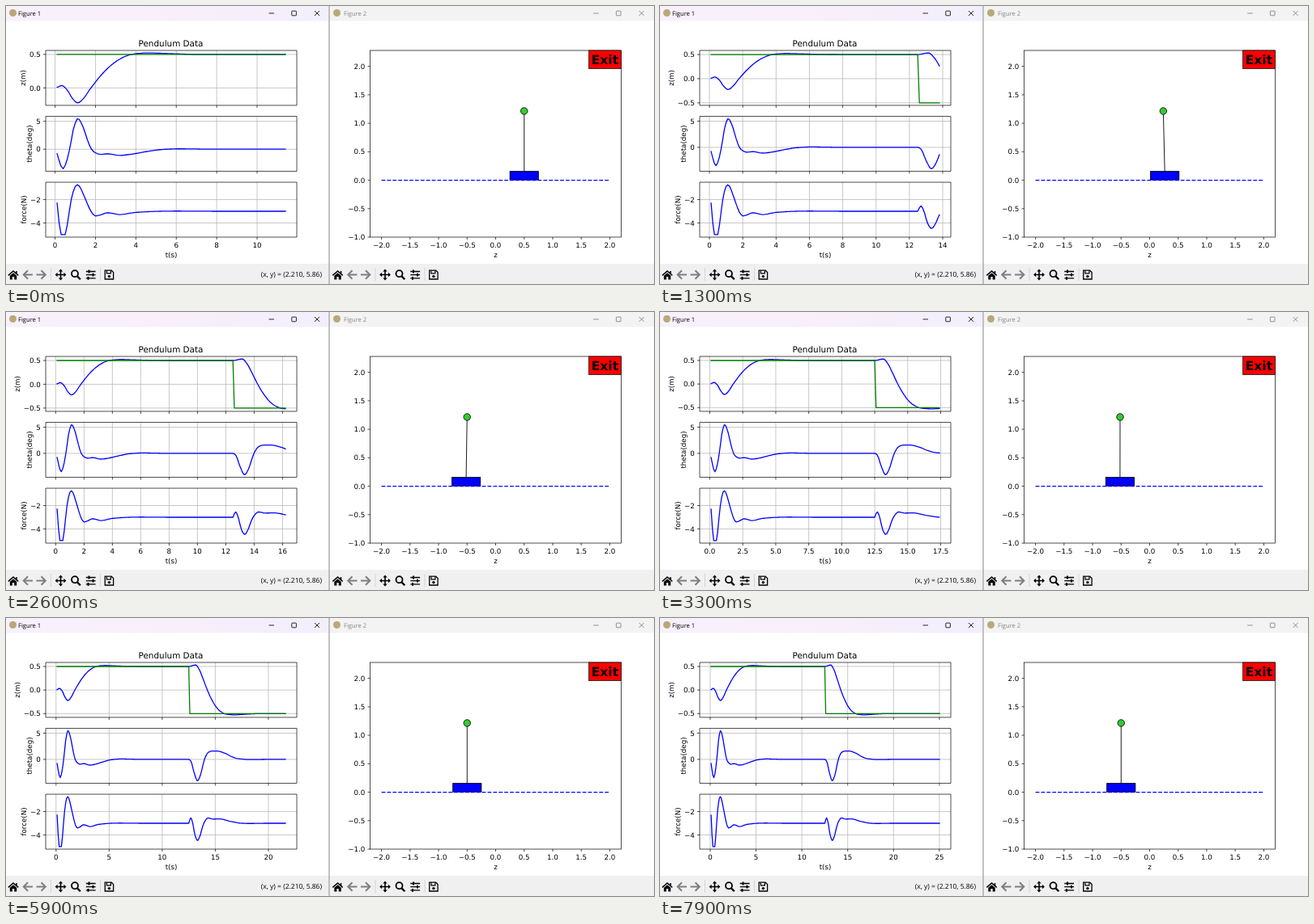
Animation of 800 by 344 pixels, one loop 8000 ms. Source, as an HTML page:

```html
<!DOCTYPE html>
<html lang="en">
<head>
<meta charset="utf-8">
<title>Pendulum</title>
<style>
  html, body { margin: 0; width: 100%; height: 100%; overflow: hidden; background: #fff; }
  svg { display: block; width: 800px; height: 344px; }
  text { font: 8.68px "DejaVu Sans", sans-serif; text-rendering: geometricPrecision; }
  .ui { font: 7.6px "Open Sans", sans-serif; }
  .coords { font: 8.5px "Open Sans", sans-serif; }
  .title { font-size: 10.42px; }
  .exit { font-size: 15.6px; font-weight: bold; }
  .mid { text-anchor: middle; }
  .end { text-anchor: end; }
  .grid { stroke: #b0b0b0; stroke-width: .7; fill: none; }
  .axis { stroke: #000; stroke-width: .7; fill: none; }
  .curve { stroke-width: 1.3; fill: none; stroke-linejoin: round; stroke-linecap: square; }
</style>
</head>
<body>
<svg viewBox="0 0 800 344">
  <defs>
    <linearGradient id="bar">
      <stop offset="0" stop-color="#f8f1fd"/>
      <stop offset=".5" stop-color="#f8effa"/>
      <stop offset="1" stop-color="#f2effc"/>
    </linearGradient>
    <g id="buttons" fill="none" stroke-width=".9">
      <path d="M324.5 9H331M381 6l6 6M387 6l-6 6"/>
      <rect x="352.8" y="6.2" width="5.6" height="5.6" rx=".6"/>
    </g>
    <g id="tools" fill="none" stroke="#000">
      <path stroke-width="1.5" d="M2.8 333.4L9 328l6.2 5.4M13 328v3"/>
      <path fill="#000" stroke="none" d="M4.8 333.8L9 330.2l4.2 3.6V338.4H10.2V335H7.8v3.4H4.8Z"/>
      <path stroke="#7f7f7f" stroke-width="2" d="M33 332.5H22M27 327.2L21.7 332.5L27 337.8M37.5 332.5H48.5M43.5 327.2L48.8 332.5L43.5 337.8"/>
      <path stroke="#cfcfcf" stroke-width=".8" d="M55.5 324V340M116.5 324V340"/>
      <path stroke-width="1.6" d="M62 332.5H73M67.5 327V338"/>
      <path fill="#000" stroke="none" d="M67.5 325.6l2.7 3h-5.4ZM67.5 339.4l2.7-3h-5.4ZM60.6 332.5l3-2.7v5.4ZM74.4 332.5l-3-2.7v5.4Z"/>
      <circle cx="85" cy="331.2" r="4" stroke-width="1.8"/>
      <path stroke-width="2.3" d="M88.2 334.6L91.8 338.2"/>
      <path stroke-width="1.3" d="M98.8 328.5H110.6M98.8 332.6H110.6M98.8 336.8H110.6"/>
      <path stroke-width="2" d="M102.5 326.6v3.8M107.5 330.7v3.8M101.5 334.9v3.8"/>
      <path stroke-width="1.3" d="M122.2 327.2H130.2L132.6 329.6V338H122.2Z"/>
      <path stroke-width="1.2" d="M124.4 327.5v3.4H129.4V327.5"/>
      <circle cx="127.4" cy="334.6" r="1.7" fill="#000" stroke="none"/>
    </g>
  </defs>

  <rect width="800" height="344" fill="#fff"/>
  <rect width="398.5" height="18.5" fill="url(#bar)"/>
  <rect x="399.5" width="400.5" height="18.5" fill="#f3f3f3"/>
  <rect y="319" width="800" height="25" fill="#f0f0f0"/>
  <rect x="398.3" width="1.4" height="344" fill="#a9a9ab"/>
  <circle cx="8.5" cy="8.5" r="4.5" fill="#b9a878"/>
  <circle cx="408.5" cy="8.5" r="4.5" fill="#b9a878"/>
  <text class="ui" x="15" y="11.7">Figure 1</text>
  <text class="ui" x="417" y="11.7" fill="#858585">Figure 2</text>
  <use href="#buttons" stroke="#111"/>
  <use href="#buttons" x="400.6" stroke="#858585"/>
  <use href="#tools"/>
  <use href="#tools" x="400.5"/>
  <text class="coords end" x="390" y="335.2">(x, y) = (2.210, 5.86)</text>
  <text class="title mid" x="203.5" y="49.6">Pendulum Data</text>

  <g id="plots"></g>

  <g id="scene">
    <g id="sceneTicks"></g>
    <rect id="cart" y="204.63" width="35.22" height="10.57" fill="#00f" stroke="#000" stroke-width=".87"/>
    <circle id="bob" r="4.23" fill="#32cd32" stroke="#000" stroke-width=".87"/>
    <path id="rod" stroke="#000" stroke-width=".9"/>
    <path d="M463.6 215.55H745.4" stroke="#00f" stroke-width="1.3" stroke-dasharray="4.81 2.08"/>
    <rect class="axis" x="449.5" y="55" width="310" height="231"/>
    <rect x="719.5" y="55" width="40" height="22.5" fill="#f00" stroke="#000" stroke-width=".7"/>
    <text class="exit mid" x="739.4" y="71.5">Exit</text>
  </g>
</svg>

<script>
const LOOP = 8000, STEP = 100;
const $ = id => document.getElementById(id);

// Shape-preserving cubic through flat [t, v, t, v, ...] knots.
function spline(flat) {
  const t = flat.filter((_, i) => i % 2 === 0), v = flat.filter((_, i) => i % 2);
  const d = t.slice(1).map((x, i) => (v[i + 1] - v[i]) / (x - t[i]));
  const m = t.map((_, i) => {
    const a = d[i - 1], b = d[i];
    return a * b > 0 ? 2 * a * b / (a + b) : 0;
  });
  return x => {
    if (x >= t.at(-1)) return v.at(-1);
    const i = Math.max(0, t.findIndex(k => k > x) - 1);
    const h = t[i + 1] - t[i], s = Math.max(0, (x - t[i]) / h), r = 1 - s;
    return v[i] * (1 + 2 * s) * r * r + v[i + 1] * s * s * (3 - 2 * s)
      + h * s * r * (m[i] * r - m[i + 1] * s);
  };
}

// Simulated seconds reached at each moment of the loop.
const CLOCK = [[0, 11.4], [1300, 13.8], [2000, 15.1], [3300, 17.4], [4600, 19.5], [5900, 21.6], [7900, 25]];

const position = spline([.1, .01, .32, .037, .6, -.03, .85, -.155, 1.12, -.224, 1.4, -.16, 1.75, -.01,
  2.4, .23, 2.8, .345, 3.2, .43, 3.6, .485, 4, .511, 4.6, .522, 5.6, .513, 7, .501, 8, .5, 12.5, .5,
  13.15, .533, 13.5, .43, 13.8, .265, 14.25, 0, 14.6, -.175, 15.1, -.365, 15.5, -.455, 16, -.51,
  16.8, -.527, 17.5, -.518, 19, -.502, 20, -.5]);
const angle = spline([.1, -.8, .25, -2.7, .4, -3.5, .55, -2.4, .72, 0, .95, 4.2, 1.13, 5.5, 1.35, 4.3,
  1.6, 1.7, 1.8, 0, 2, -.65, 2.25, -.92, 2.6, -.82, 3.2, -1.1, 3.6, -.98, 4.6, -.38, 5.2, -.08,
  6.1, .07, 8, 0, 12.5, 0, 12.7, -.35, 13, -2.5, 13.32, -4.1, 13.6, -3, 13.8, -1.4, 14, .1,
  14.3, 1.25, 14.6, 1.56, 15.1, 1.6, 15.87, 1.2, 16.5, .55, 17.1, .15, 18.2, -.04, 20.5, 0]);
const force = spline([.1, -2.3, .2, -4, .3, -5, .5, -5, .6, -4.2, .8, -2, 1, -.87, 1.1, -.73, 1.2, -.85,
  1.4, -1.55, 1.7, -2.75, 1.85, -3.2, 2, -3.4, 2.2, -3.34, 2.6, -3.13, 3.2, -3.28, 4, -3.1, 5.2, -3,
  6, -2.985, 8, -3, 12.5, -3, 12.6, -2.7, 12.7, -2.54, 12.85, -2.9, 13.1, -4.05, 13.33, -4.48,
  13.55, -4.1, 13.8, -3.3, 14, -2.85, 14.3, -2.55, 14.8, -2.64, 15.4, -2.63, 16.5, -2.86, 17.4, -2.99,
  18.2, -3.02, 20, -3]);
const reference = t => t < 12.55 ? .5 : -.5;

const LEFT = 49, WIDTH = 310, HEIGHT = 67.94;
const PANELS = [
  { top: 55, label: "z(m)", curves: [[position, "#00f"], [reference, "#008000"]] },
  { top: 136.53, label: "theta(deg)", curves: [[angle, "#00f"]] },
  { top: 218.06, label: "force(N)", curves: [[force, "#00f"]] }
];

const f = n => n.toFixed(2);
const path = (cls, d) => `<path class="${cls}" d="${d}"/>`;
const text = (cls, x, y, s) => `<text class="${cls}" x="${f(x)}" y="${f(y)}">${s}</text>`;
const textWidth = s => 8.68 * [...s].reduce((w, c) => w + (c === "." ? .318 : c === "−" ? .838 : .636), 0);

function ticks(lo, hi, maxCount) {
  const raw = (hi - lo) / maxCount, mag = 10 ** Math.floor(Math.log10(raw));
  const step = [1, 2, 2.5, 5, 10].map(s => s * mag).find(s => s >= raw - 1e-9);
  const list = [];
  for (let i = Math.ceil(lo / step); i * step <= hi; i++) {
    const value = i * step;
    list.push({ value, label: value.toFixed(step % 1 ? 1 : 0).replace("-", "−") });
  }
  return list;
}

// Data limits with a 5% margin on each side.
const padded = (lo, hi) => [lo - (hi - lo) * .05, hi + (hi - lo) * .05];
const scale = ([lo, hi], a, b) => v => a + (v - lo) / (hi - lo) * (b - a);

function drawPanel({ top, label, curves }, times) {
  const bottom = top + HEIGHT, last = label === "force(N)";
  const data = curves.map(([fn, color]) => [times.map(fn), color]);
  const all = data.flatMap(([values]) => values);
  const xLim = padded(times[0], times.at(-1)), yLim = padded(Math.min(...all), Math.max(...all));
  const X = scale(xLim, LEFT, LEFT + WIDTH), Y = scale(yLim, bottom, top);
  let grid = "", marks = "", labels = "", widest = 0;
  for (const { value, label: s } of ticks(...xLim, 9)) {
    const x = f(X(value));
    grid += `M${x} ${top}V${bottom}`;
    marks += `M${x} ${bottom}v3`;
    if (last) labels += text("mid", X(value), 299, s);
  }
  for (const { value, label: s } of ticks(...yLim, 3)) {
    const y = f(Y(value));
    grid += `M${LEFT} ${y}h${WIDTH}`;
    marks += `M${LEFT} ${y}h-3`;
    labels += text("end", LEFT - 6.1, Y(value) + 3.16, s);
    widest = Math.max(widest, textWidth(s));
  }
  const lines = data.map(([values, color]) =>
    `<polyline class="curve" stroke="${color}" points="${values.map((v, i) => f(X(times[i])) + "," + f(Y(v))).join(" ")}"/>`);
  const labelX = LEFT - 6.1 - widest - 3.5 - 1.8;
  return path("grid", grid) + lines.join("") + path("axis", marks + `M${LEFT} ${top}h${WIDTH}V${bottom}h${-WIDTH}Z`) + labels
    + `<text class="mid" transform="translate(${f(labelX)} ${f(top + HEIGHT / 2)}) rotate(-90)">${label}</text>`;
}

const UNIT = 70.45, sceneX = x => 604.5 + x * UNIT, sceneY = y => 215.55 - y * UNIT;

function drawSceneTicks() {
  let marks = "", labels = "";
  for (const { value, label } of ticks(-2.2, 2.2, 9)) {
    marks += `M${f(sceneX(value))} 286v3`;
    labels += text("mid", sceneX(value), 299, label);
  }
  for (const { value, label } of ticks(-1, 2.27, 9)) {
    marks += `M449.5 ${f(sceneY(value))}h-3`;
    labels += text("end", 443.4, sceneY(value) + 3.16, label);
  }
  $("sceneTicks").innerHTML = path("axis", marks) + labels + text("mid", 604.5, 310.9, "z");
}

function drawScene(t) {
  const z = position(t), a = angle(t) * Math.PI / 180, base = .155;
  const at = r => [sceneX(z + r * Math.sin(a)), sceneY(base + r * Math.cos(a))].map(f);
  $("cart").setAttribute("x", f(sceneX(z - .25)));
  const [bx, by] = at(1.06);
  $("bob").setAttribute("cx", bx);
  $("bob").setAttribute("cy", by);
  $("rod").setAttribute("d", `M${at(0)}L${at(1)}`);
}

function simTime(ms) {
  const i = Math.max(1, CLOCK.findIndex(([m]) => m >= ms));
  const [m0, t0] = CLOCK[i - 1], [m1, t1] = CLOCK[i];
  return Math.round((t0 + (t1 - t0) * (ms - m0) / (m1 - m0)) * 10);
}

function render(ms) {
  const count = simTime(ms);
  const times = Array.from({ length: count }, (_, i) => (i + 1) / 10);
  $("plots").innerHTML = PANELS.map(p => drawPanel(p, times)).join("") + text("mid", 204, 310.9, "t(s)");
  drawScene(count / 10);
}

let shown = -1;
const start = performance.now();
function tick() {
  const ms = Math.floor((performance.now() - start) % LOOP / STEP) * STEP;
  if (ms !== shown) render(shown = ms);
  requestAnimationFrame(tick);
}
drawSceneTicks();
tick();
</script>
</body>
</html>
```
